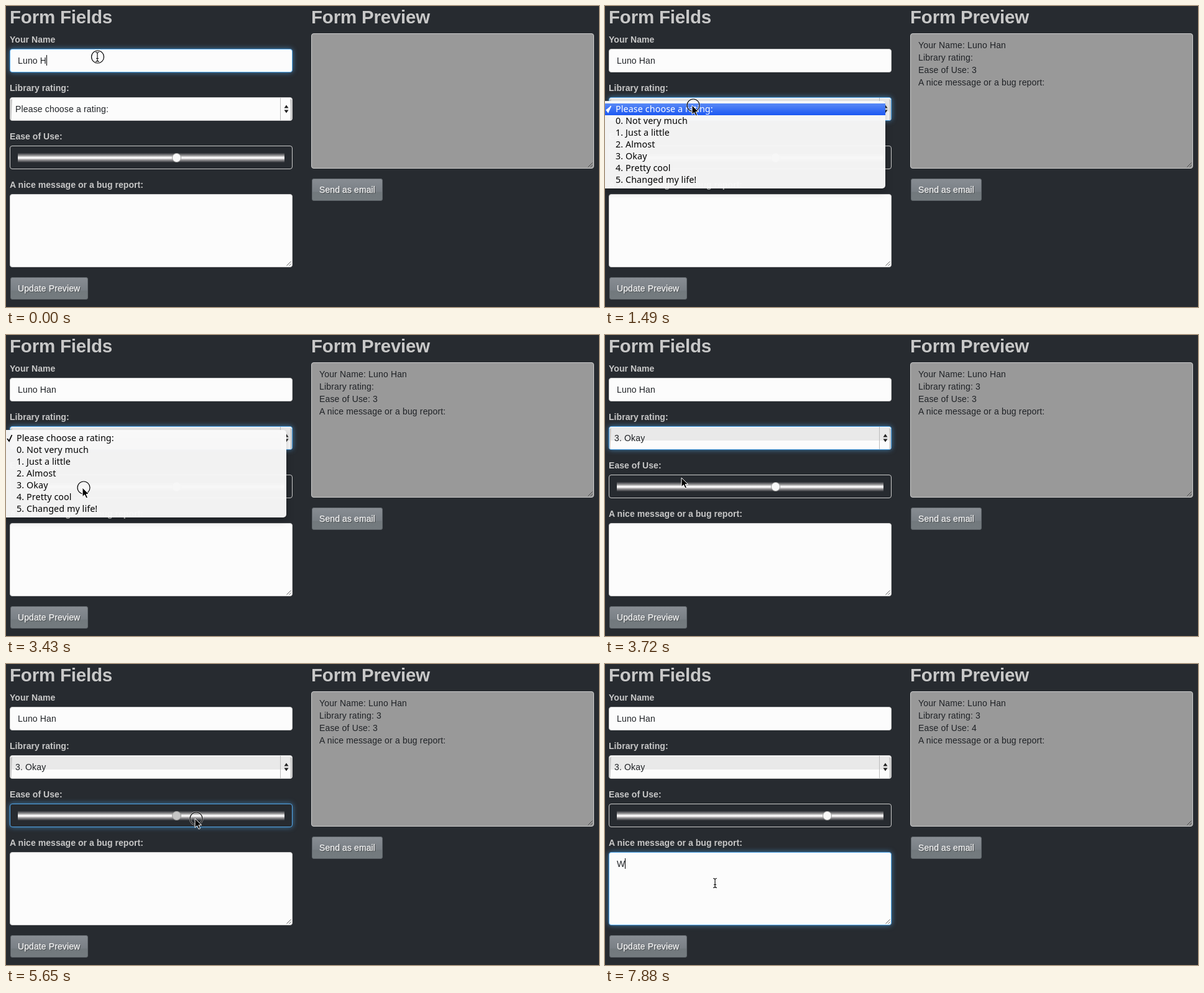
An HTML page that plays this animation: 954 px wide and 485 px high, repeating every 8000 ms.

```html
<!DOCTYPE html>
<html lang="en">
<head>
<meta charset="utf-8">
<title>Form preview</title>
<style>
html, body { margin: 0; width: 100%; height: 100%; overflow: hidden; background: #272b30; }
svg { display: block; width: 954px; height: 485px; }
text { font: 14px "Liberation Sans", Arial, sans-serif; letter-spacing: .16px; fill: #1f2226; white-space: pre; }
.head { font-size: 29.5px; font-weight: bold; letter-spacing: -.2px; fill: #c8c8c8; }
.label { font-weight: bold; letter-spacing: .05px; fill: #c8c8c8; }
.field { fill: #fcfcfc; stroke: #ccc; }
.dark { fill: #272b30; }
.gray { fill: #999; }
.focus { stroke: #52a8ec; filter: drop-shadow(0 0 4px rgba(82, 168, 236, .65)); }
.button rect { fill: url(#button); stroke: #60666b; }
.button text { fill: #fff; letter-spacing: .1px; stroke: #fff; stroke-width: .25px; text-shadow: 1px 1px 1px rgba(0, 0, 0, .35); }
.grip { stroke: #666; fill: none; }
#menu { filter: drop-shadow(0 5px 6px rgba(0, 0, 0, .25)); }
#menu text { font: 14.3px "Noto Sans", "Open Sans", sans-serif; letter-spacing: .1px; fill: #000; }
#menu .on { fill: #fff; }
#check { fill: none; stroke: #000; stroke-width: 1.8; }
#check.on { stroke: #fff; }
#thumb { fill: #f8f8f8; stroke: #999; }
#thumb.down { fill: #c6c6c6; }
#caret { stroke: #000; }
</style>
</head>
<body>
<svg viewBox="0 0 954 485">
  <defs>
    <linearGradient id="button" x2="0" y2="1">
      <stop stop-color="#888d93"/><stop offset=".58" stop-color="#7a8086"/>
      <stop offset=".62" stop-color="#72797d"/><stop offset="1" stop-color="#747b7f"/>
    </linearGradient>
    <linearGradient id="track" x2="0" y2="1">
      <stop stop-color="#33363b"/><stop offset=".3" stop-color="#a3a2a3"/>
      <stop offset=".46" stop-color="#fff"/><stop offset=".56" stop-color="#f4f2f3"/>
      <stop offset=".72" stop-color="#9b999b"/><stop offset="1" stop-color="#303338"/>
    </linearGradient>
    <linearGradient id="blue" x2="0" y2="1">
      <stop stop-color="#5a8af6"/><stop offset="1" stop-color="#1c58f2"/>
    </linearGradient>
  </defs>

  <text class="head" x="6" y="28">Form Fields</text>
  <text class="head" x="491" y="28">Form Preview</text>
  <text class="label" x="6" y="59">Your Name</text>
  <text class="label" x="6" y="137">Library rating:</text>
  <text class="label" x="6" y="215">Ease of Use:</text>
  <text class="label" x="6" y="293">A nice message or a bug report:</text>

  <rect id="name" class="field" x="6.5" y="69.5" width="454" height="37" rx="3.5"/>
  <text id="nameText" x="19" y="93"></text>

  <rect id="rating" class="field" x="6.5" y="147.5" width="454" height="37" rx="3.5"/>
  <rect id="sheen" x="9" y="149" width="448" height="21" fill="#e9e9e9"/>
  <path d="M7 151L10 150Q9 166 8.5 184L7 182ZM460 151L457 150Q458 166 457.5 184L460 182Z" fill="#c9c9c9"/>
  <path d="M441.5 148V184" stroke="#bbb"/>
  <path d="M447.500 164.500L451 159.500L454.500 164.500ZM447.500 167.500L451 172.500L454.500 167.500Z" fill="#222"/>
  <text id="ratingText" x="15" y="171"></text>

  <rect id="ease" class="field dark" x="6.5" y="225.5" width="454" height="37" rx="3.5"/>
  <rect x="19" y="237" width="429" height="15" fill="url(#track)"/>
  <circle id="thumb" cy="244.500" r="7"/>

  <rect id="message" class="field" x="6.5" y="303.5" width="454" height="117" rx="3.5"/>
  <text id="messageText" x="19" y="327"></text>
  <path class="grip" d="M451.500 418.500L458.500 411.500M455.500 418.500L458.500 415.500"/>

  <rect class="field gray" x="491.5" y="44.5" width="454" height="217" rx="3.5"/>
  <g id="preview"></g>
  <path class="grip" style="stroke:#444" d="M936.500 259.500L943.500 252.500M940.500 259.500L943.500 256.500"/>

  <g class="button">
    <rect x="7.500" y="437.500" width="124" height="35" rx="2.500"/>
    <text x="19" y="460">Update Preview</text>
  </g>
  <g class="button">
    <rect x="492.500" y="278.500" width="113" height="35" rx="2.500"/>
    <text x="504" y="301">Send as email</text>
  </g>
  <path id="caret" d="M.5 0V17"/>

  <g id="menu">
    <rect x="-10" y="153" width="461" height="141" rx="5" fill="#f9f9f9" opacity=".97"/>
    <rect id="bar" x="0" width="451" height="19" fill="url(#blue)"/>
    <path id="check" d="M2 167L5 171L9.500 161"/>
  </g>

  <g id="pointer">
    <g id="ring" fill="none">
      <circle cx="2" r="10" stroke="#fff" stroke-width="2.600" opacity=".6"/>
      <circle cx="2" r="10" stroke="#000" stroke-width="1.200"/>
    </g>
    <path id="arrow" d="M0 0V14.500L3.500 11.500L6 17L8.500 16L6 10.500H10.500Z" fill="#000" stroke="#fff"/>
    <g id="beam" fill="none">
      <path id="stem" d="M-3 -7.500Q0 -7.500 0 -5.500Q0 -7.500 3 -7.500M0 -6V6M-3 7.500Q0 7.500 0 5.500Q0 7.500 3 7.500M-2 2.500H2" stroke="#111" stroke-width="1.200"/>
    </g>
  </g>
</svg>
<script>
const LOOP = 8000, TICK = 148.7, NAME = 'Luno Han';
const OPTIONS = ['Please choose a rating:', '0. Not very much', '1. Just a little',
  '2. Almost', '3. Okay', '4. Pretty cool', '5. Changed my life!'];

// pointer path: tick, x, y
const PATH = [[0, 147, 82], [4, 147, 82], [9, 140, 160], [12, 140, 160],
  [15, 127, 214], [18, 127, 214], [19, 126, 216], [21, 123, 246], [24, 123, 246],
  [25, 123, 230], [30, 274, 246], [31, 274, 248], [35, 157, 250], [36, 157, 250],
  [38, 304, 249], [39, 345, 249], [40, 352, 250], [42, 352, 250], [46, 177, 353], [99, 177, 353]];

const $ = id => document.getElementById(id);
const between = (k, a, b) => k >= a && k <= b;
const show = (id, on) => { $(id).style.display = on ? '' : 'none'; };
const write = (el, s) => { if (el.textContent !== s) el.textContent = s; };

function addText(parent, x, y, s) {
  const el = document.createElementNS('http://www.w3.org/2000/svg', 'text');
  el.setAttribute('x', x);
  el.setAttribute('y', y);
  el.textContent = s;
  return $(parent).appendChild(el);
}
const items = OPTIONS.map((s, i) => addText('menu', 17, 171 + 19 * i, s));
const lines = [68, 88, 108, 128].map(y => addText('preview', 504, y, ''));

function pointerAt(k) {
  const i = PATH.findIndex(p => p[0] > k);
  const [t0, x0, y0] = PATH[i - 1], [t1, x1, y1] = PATH[i];
  const f = (k - t0) / (t1 - t0);
  return [x0 + (x1 - x0) * f, y0 + (y1 - y0) * f].map(Math.round);
}

function easeValue(k) {
  if (k < 31) return 3;
  return Math.round((pointerAt(Math.min(k, 40))[0] - 26) / 83);
}

function draw(k) {
  const [x, y] = pointerAt(k);
  const focus = k < 9 ? 'name' : k < 31 ? 'rating' : k < 46 ? 'ease' : 'message';
  for (const id of ['name', 'rating', 'ease', 'message']) $(id).classList.toggle('focus', id === focus);

  const value = easeValue(k);
  const rated = k >= 25;
  write($('nameText'), NAME.slice(0, 6 + Math.min(k, 2)));
  write($('ratingText'), rated ? OPTIONS[4] : OPTIONS[0]);
  write($('messageText'), k >= 53 ? 'W' : '');
  show('sheen', k >= 9);
  $('thumb').setAttribute('cx', 25.5 + 83 * value);
  $('thumb').classList.toggle('down', between(k, 31, 39));

  show('preview', k >= 9);
  ['Your Name: ' + NAME, 'Library rating: ' + (rated ? 3 : ''), 'Ease of Use: ' + value,
    'A nice message or a bug report:'].forEach((s, i) => write(lines[i], s));

  const field = focus === 'message' ? 'messageText' : 'nameText';
  const end = 19 + Math.round($(field).getComputedTextLength());
  $('caret').setAttribute('transform', `translate(${end} ${field === 'nameText' ? 79 : 313})`);
  show('caret', k <= 4 || k === 8 || between(k, 46, 49) || k >= 53);

  const row = k === 23 ? -1 : Math.floor((y - 157) / 19);
  show('menu', between(k, 10, 24));
  show('bar', row >= 0);
  $('bar').setAttribute('y', 157 + 19 * row);
  items.forEach((el, i) => el.classList.toggle('on', i === row));
  $('check').classList.toggle('on', row === 0);

  const beam = between(y, 70, 106) || y > 303;
  $('pointer').setAttribute('transform', `translate(${x} ${y})`);
  $('ring').setAttribute('transform', beam ? 'translate(-1.500 0)' : '');
  show('arrow', !beam);
  show('beam', beam);
  show('ring', k === 0 || between(k, 9, 10) || between(k, 23, 24) || between(k, 31, 39) || k === 46);
}

let start;
function frame(now) {
  start ??= now;
  draw(Math.floor(((now - start) % LOOP + 5) / TICK));
  requestAnimationFrame(frame);
}
draw(0);
requestAnimationFrame(frame);
</script>
</body>
</html>
```
